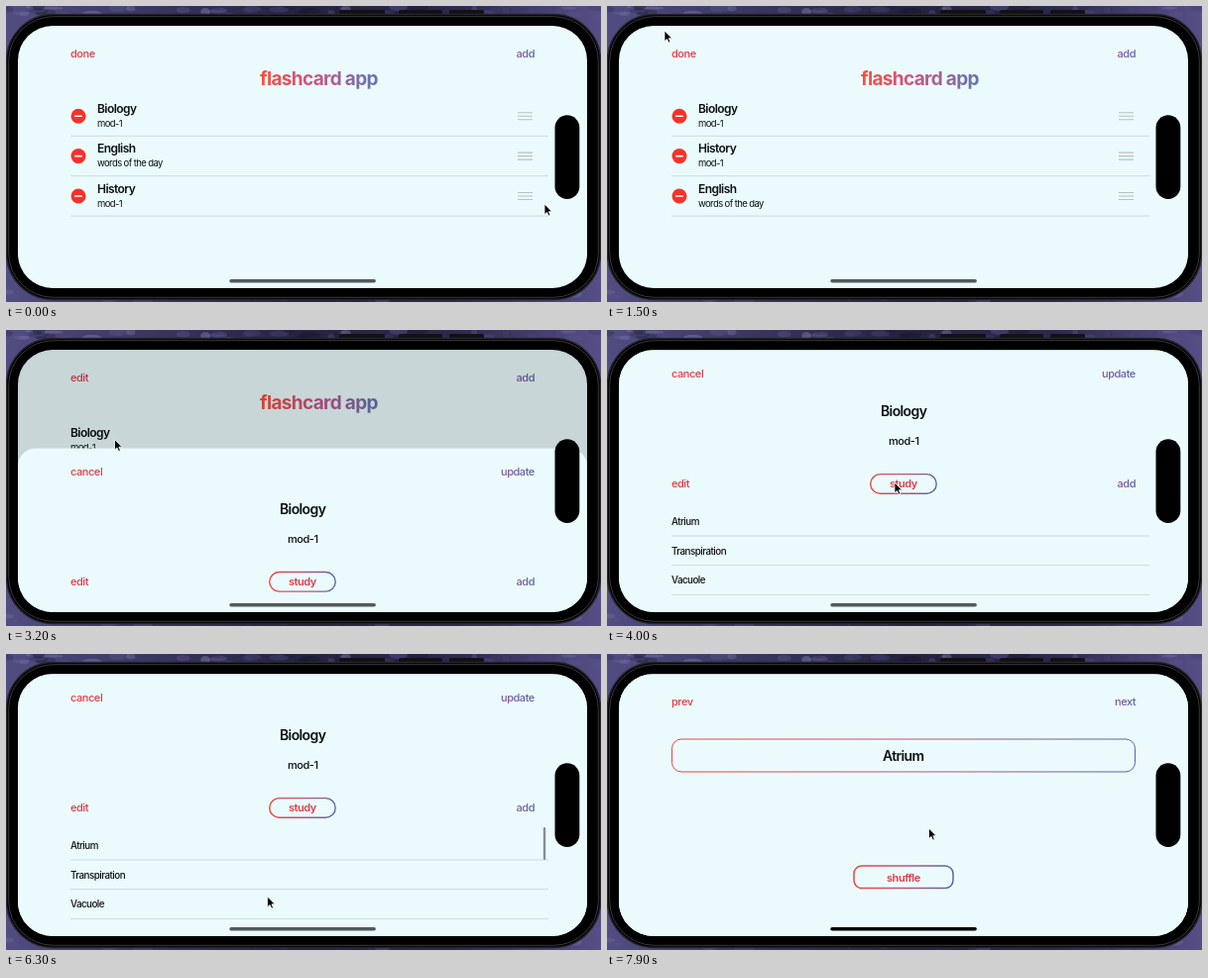
Write an HTML page that moves like this. It is 600 by 299 pixels and loops after 8 s.

```html
<!DOCTYPE html>
<html lang="en">
<head>
<meta charset="utf-8">
<title>Flashcard app</title>
<style>
  html, body { margin: 0; width: 100%; height: 100%; overflow: hidden; background: #17172b; }
  svg { display: block; width: 100vw; height: 100vh; }
  text { font-family: Inter, "Open Sans", sans-serif; fill: #0b0f10; white-space: pre; }
  .title { font-size: 19px; font-weight: 700; letter-spacing: -.65px; }
  .head { font-size: 14px; font-weight: 600; letter-spacing: -.62px; }
  .name { font-size: 12px; font-weight: 600; letter-spacing: -.55px; }
  .note { font-size: 9.5px; letter-spacing: -.6px; }
  .sub { font-size: 11px; font-weight: 500; letter-spacing: -.45px; }
  .link { font-size: 11px; font-weight: 500; letter-spacing: -.45px; }
  .strong { font-weight: 600; }
  .term { font-size: 9.8px; font-weight: 500; letter-spacing: -.52px; }
  .rule { stroke: #cddcdf; stroke-width: 1; }
  .grip { stroke: #b5c0c3; stroke-width: 1.1; }
</style>
</head>
<body>
<svg id="stage" viewBox="0 0 600 299" preserveAspectRatio="none"></svg>
<script>
const LOOP = 8000, STEP = 100;
const PAPER = '#ebfbfd';
const ROW = 40.4, TERM_ROW = 29.7;
const LIST = { top: 175, height: 96 };
const SHEET_TRAVEL = 279;

const decks = [['Biology', 'mod-1'], ['English', 'words of the day'], ['History', 'mod-1']];
const terms = ['Atrium', 'Transpiration', 'Vacuole', 'Osmosis', 'Watershed',
  'Metabolism', 'Mitosis', 'Allele', 'Enzyme', 'Ribosome'];

// Keyframes: [time, value, value...]
const pointerKeys = [
  [0, 543, 200], [400, 524, 190], [600, 524, 190], [1000, 524, 149], [1100, 524, 149],
  [1500, 58, 25], [1800, 73, 45], [2200, 73, 45], [2700, 109.5, 110.5], [3300, 109.5, 110.5],
  [3900, 290, 154], [4100, 290, 154], [4600, 249, 256], [4700, 249, 256], [5400, 248, 127],
  [5550, 248, 127], [5800, 252, 180], [6200, 256, 262], [6600, 305, 153.5],
  [7100, 305, 153.5], [7600, 324.5, 176]];
const scrollKeys = [[4700, 0], [5400, 129.8], [5800, 129.8], [6300, 0]];
const dragKeys = [[600, 0], [1000, -ROW]];
const swapKeys = [[750, 0], [1000, ROW]];
const liftKeys = [[450, 0], [600, 1], [1050, 1], [1250, 0]];
const editKeys = [[1900, 1], [2200, 0]];
const barKeys = [[4700, 0], [4800, 1], [6400, 1], [6700, 0]];
const pressKeys = [[6600, 1], [6700, .45], [7200, .45], [7400, 1]];

const smooth = x => x * x * (3 - 2 * x);
function track(keys, t) {
  const next = keys.findIndex(k => k[0] > t);
  if (next === 0) return keys[0].slice(1);
  if (next < 0) return keys[keys.length - 1].slice(1);
  const a = keys[next - 1], b = keys[next];
  const p = smooth((t - a[0]) / (b[0] - a[0]));
  return a.slice(1).map((v, i) => v + (b[i + 1] - v) * p);
}
function spring(t, start, rate = 11) {
  const x = Math.max(0, t - start) / 1000 * rate;
  const p = 1 - (1 + x) * Math.exp(-x);
  return p > .997 ? 1 : p;
}

let seed = 7;
const random = () => (seed = seed * 16807 % 2147483647) / 2147483647;

const text = (x, y, cls, str, fill = '', id = '') =>
  `<text x="${x}" y="${y}" class="${cls}"${id && ` id="${id}"`}${fill && ` style="fill:url(#${fill})"`}>${str}</text>`;
const rule = (y, x1 = 65, x2 = 547, cls = 'rule') =>
  `<line x1="${x1}" x2="${x2}" y1="${y}" y2="${y}" class="${cls}"/>`;
const box = (x, y, w, h, r, attrs) =>
  `<rect x="${x}" y="${y}" width="${w}" height="${h}" rx="${r}" ${attrs}/>`;
const outline = (x, y, w, h, r, width) =>
  box(x, y, w, h, r, `fill="none" stroke="url(#edge)" stroke-width="${width}"`);
const gradient = (id, ...colors) => `<linearGradient id="${id}">${colors.map((c, i) =>
  `<stop offset="${i / (colors.length - 1)}" stop-color="${c}"/>`).join('')}</linearGradient>`;

const mottle = () => Array.from({ length: 90 }, () => {
  const x = random() * 600, y = random() < .75 ? random() * 14 : 285 + random() * 14;
  const tone = ['#8580b4', '#3d3b6c', '#15152b', '#5c5690'][Math.floor(random() * 4)];
  return `<ellipse cx="${x}" cy="${y}" rx="${2 + random() * 9}" ry="${1 + random() * 3}" fill="${tone}" opacity="${.15 + random() * .3}"/>`;
}).join('');

const deckRow = ([name, note], i) => `<g id="deck${i}">
  ${box(12, 91.5, 574, 39, 0, `id="lift${i}" fill="${PAPER}" filter="url(#shadow)"`)}
  <g id="remove${i}"><circle cx="73" cy="111.2" r="7.5" fill="#fb3029"/>
    ${box(69, 110.4, 8, 1.6, .6, 'fill="#fff"')}</g>
  <g id="label${i}">${text(65, 108, 'name', name)}${text(65, 122, 'note', note)}</g>
  <g id="grip${i}">${[107.7, 111.2, 114.7].map(y => rule(y, 516, 531, 'grip')).join('')}</g>
</g>`;

const home = `
  ${text(65, 51.5, 'link', 'done', 'warm', 'done')}
  ${text(65, 51.5, 'link', 'edit', 'warm', 'edit')}
  ${text(514.5, 51.5, 'link', 'add', 'cool')}
  ${text(256, 80, 'title', 'flashcard app', 'banner')}
  ${[0, 1, 2].map(i => rule(131.3 + i * ROW)).join('')}
  ${decks.map(deckRow).join('')}`;

const detail = `
  ${text(65, 48, 'link', 'cancel', 'warm')}
  ${text(499, 48, 'link', 'update', 'cool')}
  ${text(276, 86.7, 'head', 'Biology')}
  ${text(284, 115.7, 'sub', 'mod-1')}
  ${text(65, 159, 'link', 'edit', 'warm')}
  ${text(514.5, 159, 'link', 'add', 'cool')}
  ${outline(265.7, 145.6, 66.5, 19.6, 9.8, 1.4)}
  ${text(285, 159.3, 'link strong', 'study', 'warm', 'study')}
  <g clip-path="url(#listClip)"><g id="terms">
    ${terms.map((term, i) => text(65, 197 + i * TERM_ROW, 'term', term) + rule(208 + i * TERM_ROW)).join('')}
  </g></g>
  ${box(541.8, LIST.top, 2.4, 33, 1.2, 'id="bar" fill="#858f92"')}`;

const cards = `
  ${text(65, 51.5, 'link', 'prev', 'warm')}
  ${text(512, 51.5, 'link', 'next', 'cool')}
  ${outline(65.5, 86, 467, 33, 9.5, 1)}
  ${text(278, 108, 'head', 'Atrium')}
  ${outline(249, 214, 100, 22.6, 8, 1.5)}
  ${text(282, 229.5, 'link strong', 'shuffle', 'warm')}`;

const sheet = (id, content) => `
  ${box(12, 20, 574, 266, 0, `id="${id}Dim" fill="#000"`)}
  <g id="${id}">${box(12, 20.5, 574, 300, 18, `fill="${PAPER}"`)}${content}</g>`;

const sideButton = (x, w) => box(x, 4, w, 7, 1.5, 'fill="#111116"');

stage.innerHTML = `
<defs>
  ${gradient('warm', '#ee3a3d', '#d33b51')}
  ${gradient('cool', '#885897', '#5865a6')}
  ${gradient('banner', '#f9503d', '#c2588a', '#5f75b1')}
  ${gradient('edge', '#ee4540', '#c45272', '#5565a6')}
  ${gradient('sky', '#514d82', '#38365f', '#24233f', '#2b294c', '#554f86')}
  <clipPath id="screenClip">${box(12, 20, 574, 265, 35, '')}</clipPath>
  <clipPath id="listClip">${box(12, LIST.top, 574, LIST.height, 0, '')}</clipPath>
  <filter id="shadow" x="-5%" y="-30%" width="110%" height="160%">
    <feDropShadow dx="0" dy="0" stdDeviation="3" flood-opacity=".25"/></filter>
</defs>
${box(0, 0, 600, 299, 0, 'fill="url(#sky)"')}
${mottle()}
${sideButton(336, 46)}${sideButton(396, 44)}${sideButton(447, 35)}
${box(.5, 8.5, 599, 288, 47, 'fill="#000" stroke="#24242a" stroke-width="1.5"')}
${box(2.7, 10.7, 594.6, 283.6, 45, 'fill="#000" stroke="#39393d" stroke-width="1"')}
<g clip-path="url(#screenClip)">
  ${box(12, 20, 574, 266, 0, `fill="${PAPER}"`)}
  ${home}
  ${sheet('detail', detail)}
  ${sheet('cards', cards)}
</g>
${box(553.5, 110.3, 24.8, 84.6, 12.4, 'fill="#000"')}
${box(225.3, 276, 147.6, 3.4, 1.7, 'id="indicator"')}
<path id="pointer" d="M0 0V10.6L2.5 8.4L4.1 12.1L5.9 11.3L4.3 7.7H7.6Z" fill="#000" stroke="#fff" stroke-width=".8" stroke-linejoin="round"/>`;

const el = id => document.getElementById(id);
const move = (id, x, y) => el(id).setAttribute('transform', `translate(${x} ${y})`);
const fade = (id, opacity) => el(id).setAttribute('opacity', opacity);

function placeSheet(id, p) {
  move(id, 0, (1 - p) * SHEET_TRAVEL);
  fade(id + 'Dim', .23 * p);
}

function draw(t) {
  const [editing] = track(editKeys, t);
  const [swap] = track(swapKeys, t), [drag] = track(dragKeys, t), [lift] = track(liftKeys, t);
  const shifts = [0, swap, drag];
  decks.forEach((_, i) => {
    move('deck' + i, 0, i * ROW + shifts[i]);
    move('label' + i, 27 * editing, 0);
    move('remove' + i, -27 * (1 - editing), 0);
    move('grip' + i, 20 * (1 - editing), 0);
    fade('remove' + i, editing);
    fade('grip' + i, editing);
    fade('lift' + i, i === 2 ? lift : 0);
  });
  fade('done', editing);
  fade('edit', 1 - editing);

  const [scroll] = track(scrollKeys, t);
  move('terms', 0, -scroll);
  move('bar', 0, scroll / (terms.length * TERM_ROW) * LIST.height);
  fade('bar', track(barKeys, t)[0]);
  fade('study', track(pressKeys, t)[0]);

  const cardsUp = spring(t, 6755);
  placeSheet('detail', spring(t, 3000));
  placeSheet('cards', cardsUp);
  el('indicator').setAttribute('fill', cardsUp > .2 ? '#000' : '#525a5d');
  move('pointer', ...track(pointerKeys, t));
}

function tick(now) {
  draw(Math.floor(now % LOOP / STEP) * STEP);
  requestAnimationFrame(tick);
}
draw(0);
requestAnimationFrame(tick);
</script>
</body>
</html>
```
